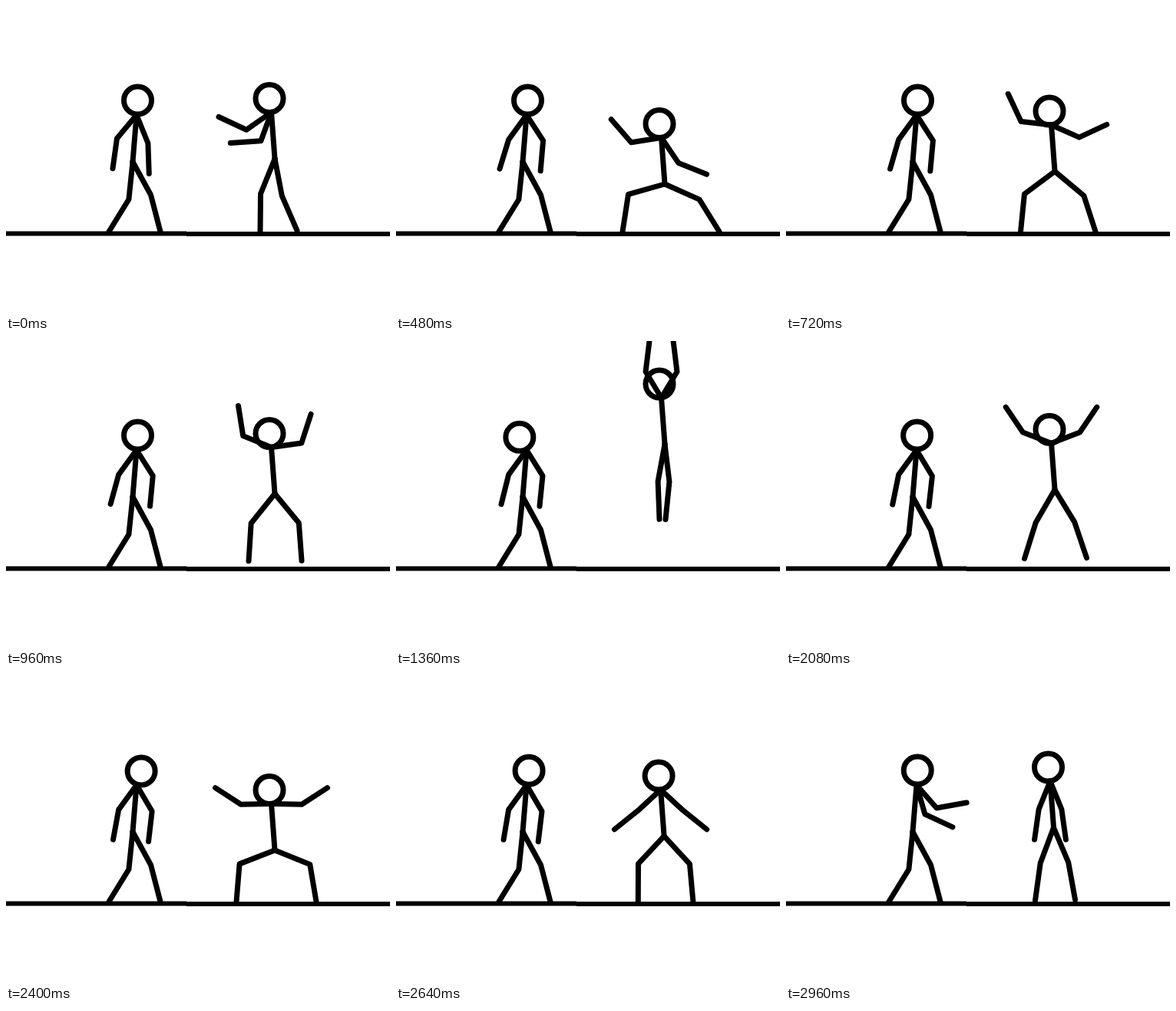
Write an HTML page with a canvas that moves like this. It is 500 px wide and 400 px high and loops after 3.04 s.

```html
<!DOCTYPE html>
<html lang="en">
<head>
<meta charset="utf-8">
<title>Stick figures</title>
<style>
  html, body { margin: 0; width: 100%; height: 100%; overflow: hidden; background: #fff; }
  canvas { display: block; }
</style>
</head>
<body>
<canvas id="stage" width="500" height="400"></canvas>
<script>
const ctx = document.getElementById('stage').getContext('2d');
const LOOP = 3040, STEP = 80, TAKEOFF = 960;
const GROUND = 294, ARM = 39.7, LEG = 49.3, REACH = 98;
const SIDES = [-1, 1];

// Arms are [upper, fore] in degrees: 0 hangs down, 90 points outward, 180 up.
const watcher = [
  { t: 0, arms: [[40, 8], [22, 2]] },
  { t: 480, arms: [[36, 17], [33, -5]] },
  { t: 2800, arms: [[36, 9], [30, -7]] },
  { t: 2960, arms: [[-16, -65], [41, 100]] }
];

// Feet are horizontal distances from the hip; arms match unless a second one is given.
const pose = (t, y, feet, arm, other = arm, extra) =>
  ({ t, x: 343, y, feet, arms: [arm, other], bend: [1, 1], reach: REACH, ...extra });

const jumper = [
  pose(0, 120.5, [-19, 29], [55, 115], [-20, -86], { bend: [1, -1] }),
  pose(480, 153.5, [-55, 71], [81, 139], [34, 68]),
  pose(TAKEOFF, 120.5, [-34, 35], [112, 171], [98, 162], { reach: 94 }),
  pose(1360, 56, [-7, 1], [149, 187]),
  pose(1760, 82, [-29, 29], [133, 169]),
  pose(2400, 148.5, [-50, 54], [89, 123], [89, 123], { easeOut: true }),
  pose(2960, 119, [-24, 28], [22, 8], [22, 8], { x: 341.5 })
];

const mix = (a, b, k) => Array.isArray(a) ? a.map((v, i) => mix(v, b[i], k)) : a + (b - a) * k;

function poseAt(keys, t) {
  const i = Math.max(1, keys.findIndex(key => key.t >= t));
  const a = keys[i - 1], b = keys[i];
  let k = (t - a.t) / (b.t - a.t);
  if (a.easeOut) k = Math.sin(k * Math.PI / 2);
  const now = {};
  for (const name in b) now[name] = mix(a[name], b[name], k);
  return now;
}

function line(...points) {
  ctx.beginPath();
  points.forEach(p => ctx.lineTo(...p));
  ctx.stroke();
}

function drawArm(neck, side, angles) {
  let [x, y] = neck;
  line(neck, ...angles.map(deg => {
    const r = deg * Math.PI / 180;
    return [x += side * ARM * Math.sin(r), y += ARM * Math.cos(r)];
  }));
}

// Legs hang at their reach in the air; on the ground the knee bends to fit.
function drawLeg([x, y], side, dx, bend, reach) {
  const dy = Math.min(GROUND - y, Math.sqrt(reach * reach - dx * dx));
  const d = Math.hypot(dx, dy);
  const out = side * bend * Math.sqrt(Math.max(0, LEG * LEG - d * d / 4)) / d;
  line([x, y], [x + dx / 2 + dy * out, y + dy / 2 - dx * out], [x + dx, y + dy]);
}

function drawMan({ head, neck, hip, arms, feet, bend, reach }) {
  line(neck, hip);
  SIDES.forEach((side, i) => {
    drawArm(neck, side, arms[i]);
    drawLeg(hip, side, feet[i], bend[i], reach);
  });
  ctx.beginPath();
  ctx.arc(...head, 18, 0, 2 * Math.PI);
  ctx.stroke();
}

function draw() {
  const t = Math.floor(performance.now() % LOOP / STEP) * STEP;
  ctx.clearRect(0, 0, 500, 400);
  ctx.lineWidth = 7;
  ctx.lineCap = ctx.lineJoin = 'round';
  ctx.fillRect(0, GROUND - 0.5, 235, 6);
  ctx.fillRect(235, GROUND, 265, 6);

  const p = poseAt(jumper, t);
  drawMan({ ...p, head: [p.x, p.y], neck: [p.x + 2.5, p.y + 18], hip: [p.x + 7, p.y + 78.5] });

  // The watcher tilts his head to follow the jump.
  const tilt = 1.5 + (t > TAKEOFF ? (p.y - 120.5) * 0.165 : 0);
  drawMan({
    ...poseAt(watcher, t),
    head: [170 + tilt, 142 - Math.sqrt(19 * 19 - tilt * tilt)],
    neck: [170, 142], hip: [165, 203], feet: [-31, 36], bend: [-1, 1], reach: REACH
  });
  requestAnimationFrame(draw);
}
draw();
</script>
</body>
</html>
```
